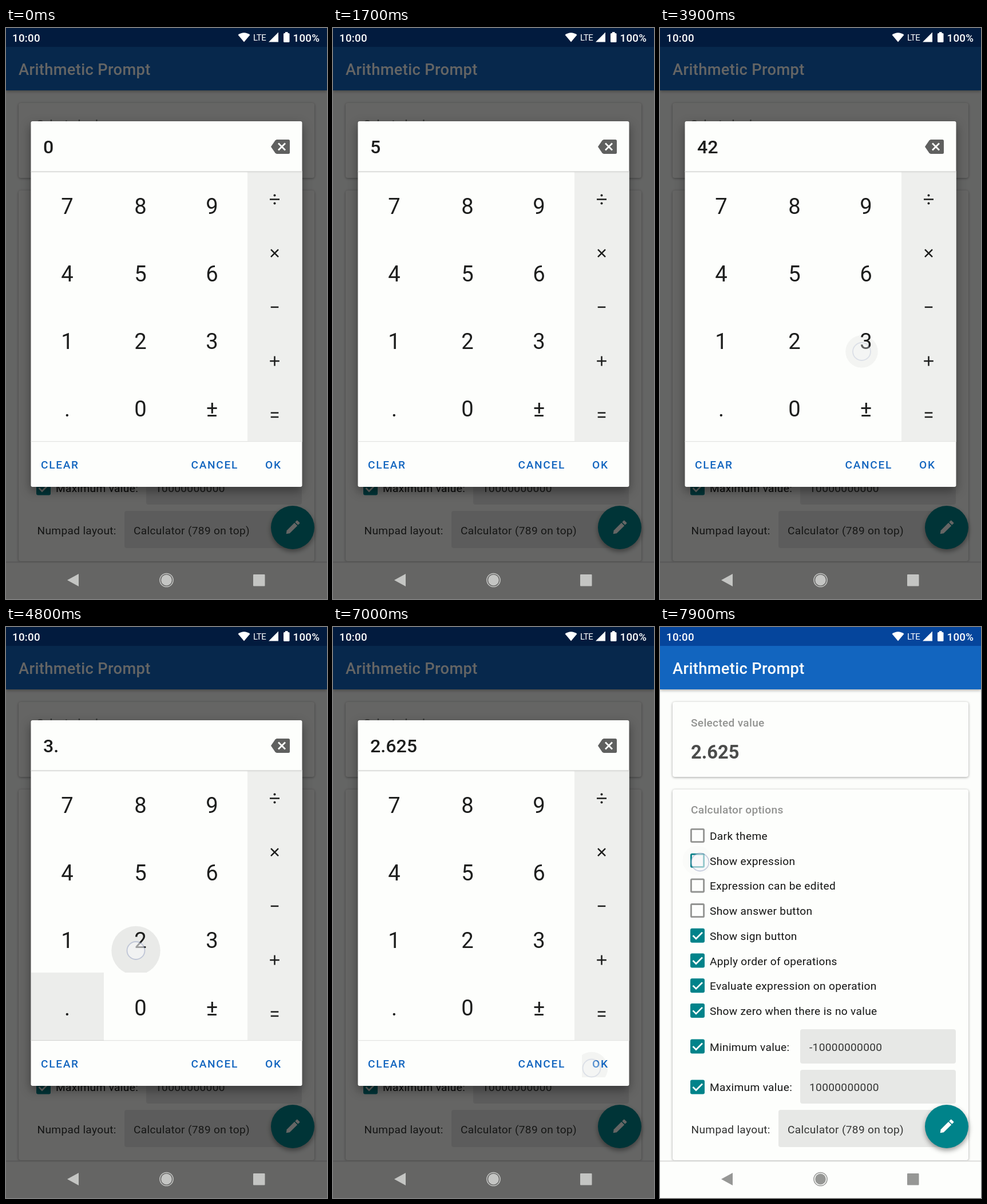
Recreate the animation shown at these times as an HTML page with a canvas. Size 561x998 px, loop 8000 ms.

```html
<!DOCTYPE html>
<html lang="en">
<head>
<meta charset="utf-8">
<title>Keypad</title>
<style>
html, body { margin: 0; width: 100%; height: 100%; overflow: hidden; background: #fcfdfb; }
canvas { display: block; width: 561px; height: 998px; }
</style>
</head>
<body>
<canvas id="stage" width="561" height="998"></canvas>
<script>
const W = 561, H = 998, LOOP = 8000;
const WHITE = '#fdfefc', BLUE = '#1265bf', TEAL = '#00838a', GREY = '#929391';
const screen = document.getElementById('stage').getContext('2d');
const layer = document.createElement('canvas');
layer.width = W;
layer.height = H;
const dialog = layer.getContext('2d');
let c = screen;

const COLS = [44, 171, 299, 422], ROWS = [251, 369, 487, 604, 723];
const KEY_X = [107, 235, 360];
const KEYS = ['789', '456', '123', '.0±'];
const OPS = ['÷', '×', '−', '+', '='];
const RELEASE = 100, RIPPLE = 400;

// time of touch, key, readout once the finger lifts
const TAPS = [
  [200, '1', '1'], [570, '2', '12'], [940, '+', '12'], [1300, '5', '5'],
  [1800, '×', '17'], [2380, '6', '6'], [2900, '÷', '42'], [3900, '3', '3'],
  [4500, '.', '3.'], [4760, '2', '3.2'], [5200, '±', '-3.2'],
  [6000, '=', '2.625'], [7000, 'OK', '2.625']
];
const DISMISS = 7070, CHECK_TAP = 7800;

const clamp = (v, lo = 0, hi = 1) => Math.min(hi, Math.max(lo, v));
const progress = (t, from, to) => clamp((t - from) / (to - from));

function text(s, x, y, size, color, { weight = 400, spacing = 0, align = 'left' } = {}) {
  c.font = `${weight} ${size}px Roboto, sans-serif`;
  c.letterSpacing = spacing + 'px';
  c.textAlign = align;
  c.fillStyle = color;
  c.fillText(s, x, y);
}

function rect(x, y, w, h, color, r = 0) {
  c.fillStyle = color;
  c.beginPath();
  c.roundRect(x, y, w, h, r);
  c.fill();
}

function disc(x, y, r, color) {
  c.fillStyle = color;
  c.beginPath();
  c.arc(x, y, r, 0, Math.PI * 2);
  c.fill();
}

function path(points, close = true) {
  c.beginPath();
  points.forEach(([x, y]) => c.lineTo(x, y));
  if (close) c.closePath();
}

function poly(points, color) {
  path(points);
  c.fillStyle = color;
  c.fill();
}

function line(points, color, width) {
  path(points, false);
  c.strokeStyle = color;
  c.lineWidth = width;
  c.stroke();
}

function shadowed(color, blur, dy, draw) {
  c.save();
  c.shadowColor = color;
  c.shadowBlur = blur;
  c.shadowOffsetY = dy;
  draw();
  c.restore();
}

function card(y, h) {
  shadowed('rgba(0,0,0,.36)', 4, 1, () => rect(22, y, 517, h, WHITE, 4));
}

function checkbox(y, checked, color = GREY) {
  if (checked) {
    rect(53, y - 12.5, 25, 25, TEAL, 3);
    line([[57.5, y], [63, y + 5.5], [74, y - 5.5]], WHITE, 2.7);
  } else {
    c.strokeStyle = color;
    c.lineWidth = 2.8;
    c.beginPath();
    c.roundRect(54.4, y - 11.1, 22.2, 22.2, 1.5);
    c.stroke();
  }
}

function body(s, x, y, color = '#141514') {
  text(s, x, y + 7, 19.1, color, { spacing: 0.34 });
}

function field(s, x, y, h, mid) {
  rect(x, y, 517 - x, h, '#e7e8e6', 4);
  body(s, x + 16, mid, '#353635');
}

function pencil() {
  c.save();
  c.translate(501, 873);
  c.rotate(Math.PI / 4);
  poly([[-3.6, -8], [3.6, -8], [3.6, 11], [0, 16], [-3.6, 11]], WHITE);
  rect(-3.6, -14.5, 7.2, 5, WHITE, 1);
  c.restore();
}

function page(t) {
  rect(0, 0, W, H, '#fcfdfb');
  shadowed('rgba(0,0,0,.3)', 5, 2, () => rect(0, 33, W, 76, BLUE));
  rect(0, 0, W, 33, '#05459c');
  text('Arithmetic Prompt', 22, 82, 27.3, WHITE, { weight: 500, spacing: 0.34 });

  const heading = { weight: 500, spacing: 0.3 };
  card(131, 131);
  text('Selected value', 54, 174, 19.1, GREY, heading);
  text('2.625', 54, 230, 32.7, '#4b4c4b', { weight: 700 });

  card(284, 648);
  text('Calculator options', 54, 326, 19.1, GREY, heading);
  const pressed = t >= CHECK_TAP + 60;
  ['Dark theme', 'Show expression', 'Expression can be edited', 'Show answer button',
    'Show sign button', 'Apply order of operations', 'Evaluate expression on operation',
    'Show zero when there is no value'].forEach((label, i) => {
    const y = 364.5 + i * 43.7;
    checkbox(y, i > 3, pressed && i === 1 ? TEAL : GREY);
    body(label, 87, y + 0.5);
  });
  checkbox(733, true);
  body('Minimum value:', 87, 733.5);
  field('-10000000000', 245, 703, 60, 733.5);
  checkbox(804, true);
  body('Maximum value:', 87, 804);
  field('10000000000', 245, 774, 59, 804);
  body('Numpad layout:', 54.5, 878, '#303130');
  field('Calculator (789 on top)', 207, 844, 65, 878);

  shadowed('rgba(0,0,0,.4)', 9, 4, () => disc(501, 873, 38, TEAL));
  pencil();
  rect(0, 933, W, 65, WHITE);
  rect(0, 932.5, W, 2, '#dddedc');
}

function systemIcons(open) {
  const status = { weight: 500, spacing: 0.3 };
  text('10:00', 11, 24, 18.7, '#fff', status);
  text('100%', 501.5, 24, 18.7, '#fff', status);
  text('LTE', 432, 22, 15, '#fff', { spacing: -0.4 });
  c.fillStyle = '#fff';
  c.beginPath();
  c.moveTo(416, 24.5);
  c.lineTo(405.5, 12);
  c.quadraticCurveTo(416, 4.5, 426.5, 12);
  c.fill();
  poly([[459, 24.5], [476, 24.5], [476, 7.5]], '#fff');
  rect(485, 9, 10.5, 16, '#fff', 1.5);
  rect(488, 7, 4.5, 3, '#fff');

  const tone = open ? '#c4c5c3' : '#969795';
  poly([[107, 965], [127, 954], [127, 976]], tone);
  disc(280.5, 965, 9.4, tone);
  c.strokeStyle = tone;
  c.lineWidth = 1.5;
  c.beginPath();
  c.arc(280.5, 965, 11.6, 0, Math.PI * 2);
  c.stroke();
  rect(432, 955, 20.5, 20.5, tone, 1);
}

function keyBox(key) {
  if (key === 'OK') return [435, 738, 64, 49];
  const op = OPS.indexOf(key);
  if (op >= 0) return [422, 251 + op * 94.4, 95, 94.4];
  const row = KEYS.findIndex(r => r.includes(key)), col = KEYS[row].indexOf(key);
  return [COLS[col], ROWS[row], COLS[col + 1] - COLS[col], ROWS[row + 1] - ROWS[row]];
}

function touchPoint(key) {
  const [x, y, w, h] = keyBox(key);
  return key === 'OK' ? [452, 771] : [x + w / 2 - 8, y + h / 2 + (w > 100 ? 20 : 8)];
}

function ripple(key, age) {
  if (age < 0 || age >= RIPPLE) return;
  const [x, y] = touchPoint(key);
  const alpha = 0.08 * clamp(0.5 + age / 80) * (1 - progress(age, 280, RIPPLE));
  c.save();
  c.beginPath();
  c.rect(...keyBox(key));
  c.clip();
  disc(x, y, 28 + age * 0.36, `rgba(0,0,0,${alpha})`);
  c.restore();
}

function touch(x, y, age) {
  if (age < 0 || age > 250) return;
  c.save();
  c.globalAlpha = clamp(0.5 + age / 60) * (1 - progress(age, 150, 250) * 0.6);
  disc(x, y, 15, 'rgba(246,247,248,.6)');
  c.strokeStyle = 'rgba(150,162,195,.5)';
  c.lineWidth = 1.8;
  c.beginPath();
  c.arc(x, y, 15.5, 0, Math.PI * 2);
  c.stroke();
  c.restore();
}

function opSymbol(op, x, y) {
  const ink = '#1b1c1b';
  const bar = (r, dy = 0) => line([[x - r, y + dy], [x + r, y + dy]], ink, 2.5);
  if (op === '÷') {
    bar(8.5);
    disc(x, y - 7, 2, ink);
    disc(x, y + 7, 2, ink);
  } else if (op === '×') {
    line([[x - 6.5, y - 6.5], [x + 6.5, y + 6.5]], ink, 2.5);
    line([[x - 6.5, y + 6.5], [x + 6.5, y - 6.5]], ink, 2.5);
  } else if (op === '=') {
    bar(6.8, -3.7);
    bar(6.8, 3.7);
  } else {
    bar(op === '+' ? 8.3 : 6.8);
    if (op === '+') line([[x, y - 8.5], [x, y + 8.5]], ink, 2.5);
  }
}

function backspace() {
  const ink = '#5f605f';
  poly([[463, 207.5], [470.5, 196.5], [473, 195], [485, 195], [485, 220], [473, 220], [470.5, 218.5]], ink);
  rect(475, 195, 21, 25, ink, 2.5);
  line([[476, 201.5], [488, 213.5]], WHITE, 2.8);
  line([[476, 213.5], [488, 201.5]], WHITE, 2.8);
}

function drawDialog(t) {
  c.clearRect(0, 0, W, H);
  shadowed('rgba(0,0,0,.4)', 18, 7, () => rect(43.5, 163, 474, 639, WHITE, 3));
  rect(422, 251, 95.5, 472, '#eeefed');
  rect(43.5, 250, 474, 1.8, '#dcdddb');
  rect(43.5, 251.8, 474, 1.4, 'rgba(0,0,0,.04)');
  rect(43.5, 722, 474, 1.2, '#e3e4e2');

  TAPS.forEach(([start, key]) => ripple(key, t - start));

  const last = TAPS.filter(([start]) => t >= start + RELEASE).pop();
  text(last ? last[2] : '0', 65, 219, 32.2, '#1d1e1d', { weight: 500 });
  backspace();

  KEYS.forEach((row, r) => [...row].forEach((key, i) =>
    text(key, KEY_X[i], 325 + r * 118, 38.2, '#1d1e1d', { align: 'center' })));
  OPS.forEach((op, i) => opSymbol(op, 469.5, 299.5 + i * 94.2));

  [['CLEAR', 61], ['CANCEL', 323.5], ['OK', 453]].forEach(([label, x]) =>
    text(label, x, 770, 19.1, BLUE, { weight: 500, spacing: 1.7 }));
}

function render(t) {
  c = screen;
  page(t);
  const dim = 0.6 * (1 - progress(t, 7100, 7250));
  const opacity = 1 - progress(t, DISMISS, 7207);
  rect(0, 0, W, H, `rgba(0,0,0,${t < 7100 ? 0.6 : dim})`);
  systemIcons(t < 7150);

  if (opacity > 0) {
    c = dialog;
    drawDialog(t);
    c = screen;
    c.save();
    c.globalAlpha = opacity;
    c.drawImage(layer, 0, 0);
    c.restore();
  }

  TAPS.forEach(([start, key]) => touch(...touchPoint(key), t - start));
  if (t >= CHECK_TAP) {
    disc(65, 408, 34 * progress(t, CHECK_TAP - 50, CHECK_TAP + 150), 'rgba(0,0,0,.012)');
    touch(70, 411, Math.min(t - CHECK_TAP, 140));
  }
}

const origin = performance.now();
function tick() {
  render((performance.now() - origin) % LOOP);
  requestAnimationFrame(tick);
}
tick();
</script>
</body>
</html>
```
